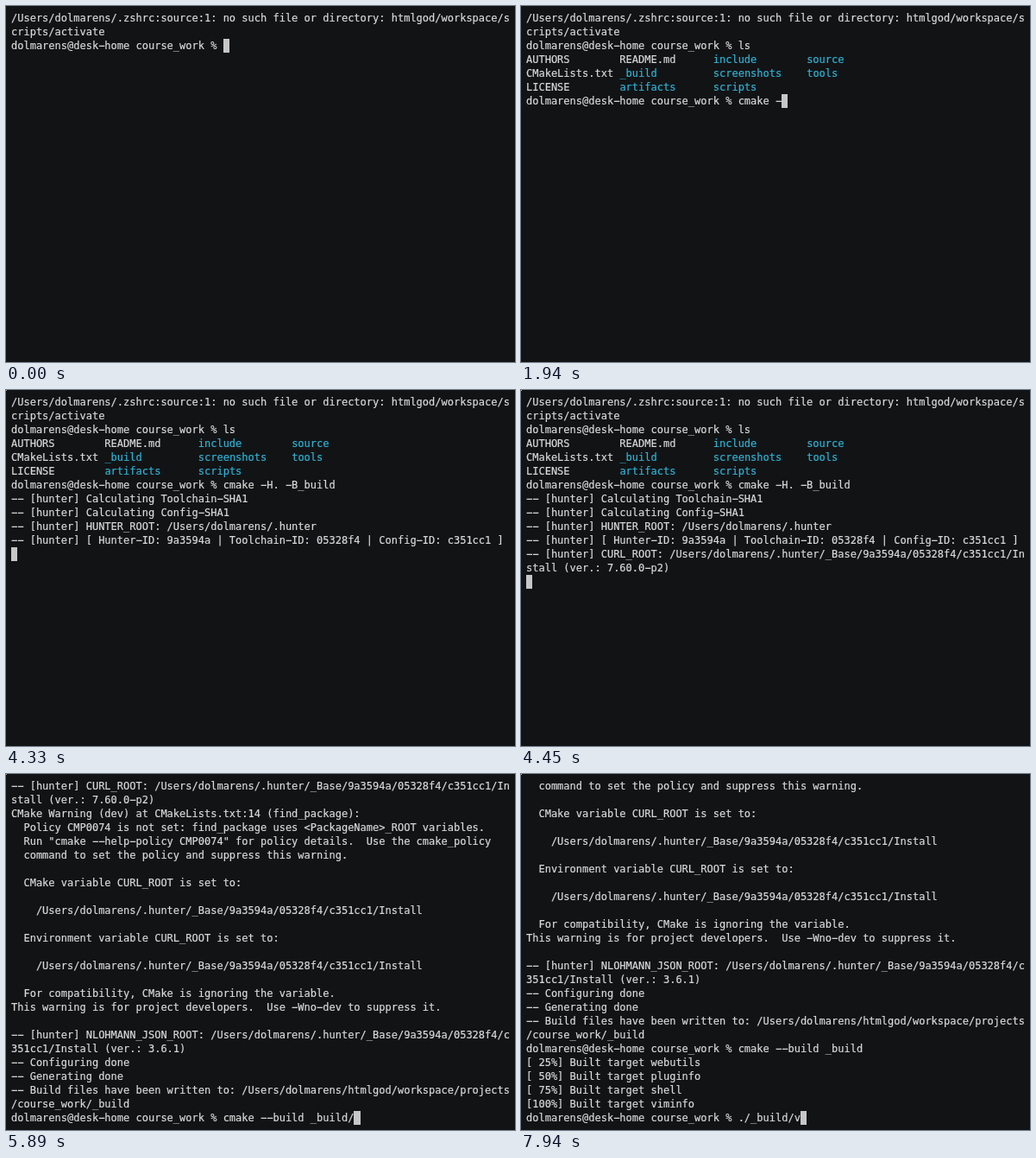
Recreate the animation shown at these times as an HTML page. Size 590 px wide and 412 px high, loop 8000 ms.

```html
<!DOCTYPE html>
<html lang="en">
<head>
<meta charset="utf-8">
<title>Terminal</title>
<style>
  html, body { margin: 0; width: 100%; height: 100%; overflow: hidden; background: #121315; }
  #screen {
    position: absolute; left: 6px; top: 6px; margin: 0;
    font: 12px/16px "DejaVu Sans Mono", monospace;
    font-variant-ligatures: none;
    color: #d9d9d9;
    -webkit-text-stroke: 0.2px;
  }
  .dir { color: #2fb3d5; }
  .cursor { display: inline-block; width: 1ch; height: 16px; vertical-align: top; background: #c7c7c7; }
  #corner { position: absolute; left: 0; top: 0; width: 1px; height: 1px; background: #b0b0b0; }
</style>
</head>
<body>
<pre id="screen"></pre>
<div id="corner"></div>
<script>
const LOOP = 8000, COLS = 80, ROWS = 25, CORNER_FROM = 2520;
const HOME = '/Users/dolmarens';
const PROMPT = 'dolmarens@desk-home course_work % ';
const INSTALL = HOME + '/.hunter/_Base/9a3594a/05328f4/c351cc1/Install';

const listing = `
AUTHORS        README.md      «include»        «source»
CMakeLists.txt «_build»         «screenshots»    «tools»
LICENSE        «artifacts»      «scripts»
${PROMPT}`;

const warning = `CMake Warning (dev) at CMakeLists.txt:14 (find_package):
  Policy CMP0074 is not set: find_package uses <PackageName>_ROOT variables.
  Run "cmake --help-policy CMP0074" for policy details.  Use the cmake_policy
  command to set the policy and suppress this warning.

  CMake variable CURL_ROOT is set to:

    ${INSTALL}

  Environment variable CURL_ROOT is set to:

    ${INSTALL}

  For compatibility, CMake is ignoring the variable.
This warning is for project developers.  Use -Wno-dev to suppress it.

`;

const configured = `-- [hunter] NLOHMANN_JSON_ROOT: ${INSTALL} (ver.: 3.6.1)
-- Configuring done
-- Generating done
-- Build files have been written to: ${HOME}/htmlgod/workspace/projects/course_work/_build
${PROMPT}`;

const built = `
[ 25%] Built target webutils
[ 50%] Built target pluginfo
[ 75%] Built target shell
[100%] Built target viminfo
${PROMPT}`;

// Types text from start to end in evenly spaced steps.
function type(start, end, text, steps = text.length) {
  let done = 0;
  return Array.from({ length: steps }, (_, i) => {
    const k = steps > 1 ? i / (steps - 1) : 1;
    const upTo = Math.round(1 + (text.length - 1) * k);
    const part = text.slice(done, upTo);
    done = upTo;
    return [Math.round(start + (end - start) * k), part];
  });
}

// Each step appends its text to the terminal; \b removes one character.
const steps = [
  [0, `${HOME}/.zshrc:source:1: no such file or directory: htmlgod/workspace/scripts/activate\n${PROMPT}`],
  [860, 'ls'],
  [920, listing],
  ...type(1450, 1750, 'cmake '),
  [1940, '-'],
  ...type(2140, 2270, 'H.'),
  ...type(2460, 2840, ' -B'),
  ...type(3040, 3170, '_b'),
  ...type(3430, 3610, 'uild'),
  [3810, '\n'],
  [3870, '-- [hunter] Calculating Toolchain-SHA1\n'],
  [4270, '-- [hunter] Calculating Config-SHA1\n'],
  [4330, `-- [hunter] HUNTER_ROOT: ${HOME}/.hunter\n` +
         '-- [hunter] [ Hunter-ID: 9a3594a | Toolchain-ID: 05328f4 | Config-ID: c351cc1 ]\n'],
  [4390, `-- [hunter] CURL_ROOT: ${INSTALL} (ver.: 7.60.0-p2)\n`],
  [4520, warning],
  [4580, configured],
  ...type(4780, 5570, 'cmake --build _', 13),
  [5630, 'b'],
  [5890, 'uild/'],
  [6220, '\b' + built],
  [6880, '.'],
  [7080, '/'],
  [7480, '_'],
  [7680, 'build/'],
  [7940, 'v']
];

const wrap = line => line.match(new RegExp(`.{1,${COLS}}`, 'g')) || [''];

// The minus sign gives the wide hyphen of the terminal face.
const toHtml = text => text
  .replace(/&/g, '&amp;').replace(/</g, '&lt;')
  .replace(/-/g, '\u2212')
  .replace(/«(.*?)»/g, '<span class="dir">$1</span>');

let buffer = '';
const screens = steps.map(([time, text]) => {
  buffer = (buffer + text).replace(/.[\b]/g, '');
  const rows = buffer.split('\n').flatMap(wrap).slice(-ROWS);
  return { time, html: toHtml(rows.join('\n')) + '<span class="cursor"></span>' };
});

const screen = document.getElementById('screen');
const corner = document.getElementById('corner');
const origin = performance.now();
let shown = null;

function draw() {
  const t = Math.max(0, performance.now() - origin) % LOOP;
  const current = screens.filter(s => s.time <= t).pop();
  if (current !== shown) {
    screen.innerHTML = current.html;
    shown = current;
  }
  corner.hidden = t < CORNER_FROM;
  requestAnimationFrame(draw);
}
draw();
</script>
</body>
</html>
```
